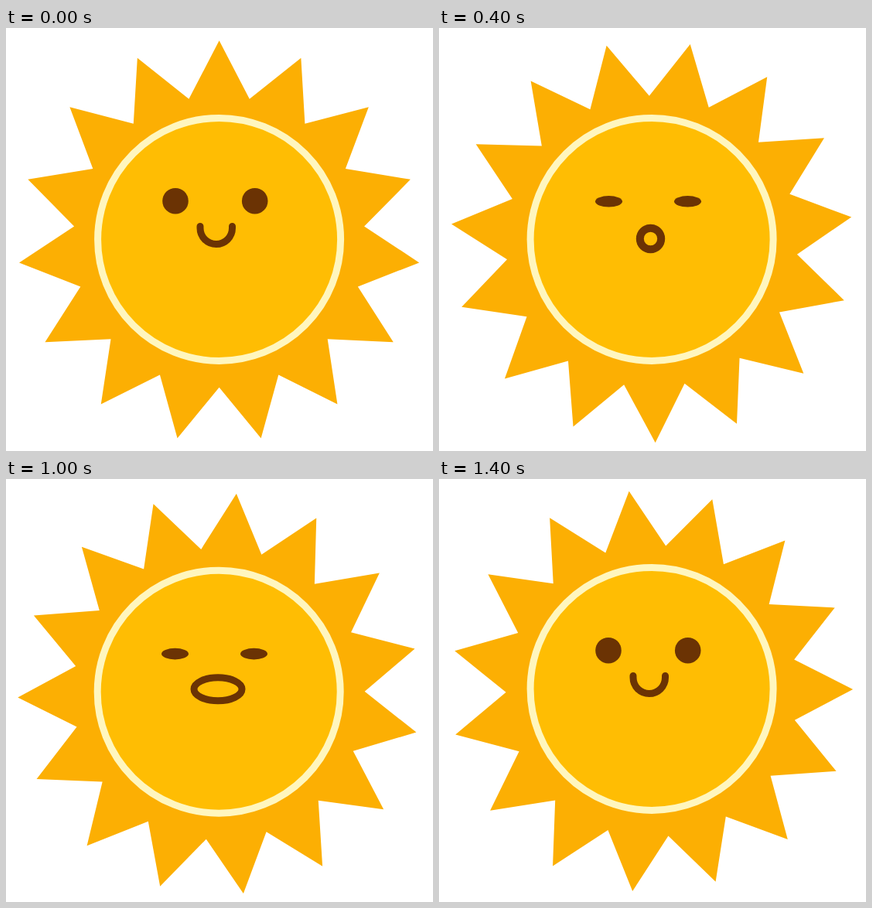
Recreate the animation shown at these times as an HTML page. Size 552x547 px, loop 1600 ms.

```html
<!DOCTYPE html>
<html lang="en">
<head>
<meta charset="utf-8">
<title>Sun</title>
<style>
  html, body { margin: 0; width: 100%; height: 100%; overflow: hidden; background: #fff; }
  svg { display: block; width: 100%; height: 100%; }
</style>
</head>
<body>
<svg viewBox="0 0 552 547">
  <g id="sun">
    <polygon id="rays" fill="#fcaf03"/>
    <circle id="disc" cy="273.4" r="157" fill="#ffbd03" stroke="#fff6be" stroke-width="9"/>
    <g fill="#6b3304">
      <ellipse id="left"/>
      <ellipse id="right"/>
    </g>
    <path id="mouth" fill="none" stroke="#6b3304" stroke-linecap="round"/>
  </g>
</svg>
<script>
const STEP = 200, RAYS = 15;
const $ = id => document.getElementById(id);
const set = (id, attrs) => {
  for (const k in attrs) $(id).setAttribute(k, attrs[k]);
};

const ring = (x, y, rx, ry = rx) =>
  `M${x - rx} ${y}a${rx} ${ry} 0 1 0 ${2 * rx} 0a${rx} ${ry} 0 1 0 ${-2 * rx} 0z`;
const cup = (x, y, r) =>
  `M${x - r} ${y}v2.3a${r} ${r} 0 0 0 ${2 * r} 0v-2.3`;

// Four poses of the body: turn in degrees, bob in pixels, centre x
const body = [
  { turn: 0, bob: 0, x: 275.6 },
  { turn: 5, bob: 1.8, x: 275.2 },
  { turn: 11, bob: 0, x: 275.1 },
  { turn: 17.5, bob: -2, x: 275.1 }
];

// Eight faces: left eye x, eye spacing, eye radii, mouth path and weight
const smile = { x: 219, gap: 102.7, rx: 16.8, ry: 16.8, y: 223.7, mouth: cup(271.75, 256.5, 20.75), w: 9 };
const shut = { x: 218.5, gap: 102, rx: 17.5, ry: 3.5, y: 224.3, w: 9 };
const faces = [
  smile,
  { ...shut, ry: 12, mouth: cup(272.5, 262, 14) },
  { ...shut, x: 219.5, ry: 7.3, mouth: ring(273.5, 272.5, 13.7), w: 10 },
  { ...shut, mouth: ring(275, 265.5, 27.5) },
  { ...shut, mouth: ring(275, 268.5, 27.5) },
  { ...shut, ry: 7.3, mouth: ring(274, 270, 31, 15) },
  { ...shut, ry: 12, mouth: "M239.7 269.7Q273 280.8 306.3 269.7" },
  smile
];

function star(cx, cy, turn) {
  const pts = [];
  for (let i = 0; i < RAYS * 2; i++) {
    const a = (turn + i * 180 / RAYS) * Math.PI / 180;
    const r = i % 2 ? 188.5 : 260;
    pts.push((cx + r * Math.sin(a)).toFixed(2) + "," + (cy - r * Math.cos(a)).toFixed(2));
  }
  return pts.join(" ");
}

function draw(n) {
  const b = body[n % body.length], f = faces[n];
  const eye = { cy: f.y, rx: f.rx, ry: f.ry };
  set("sun", { transform: `translate(0 ${b.bob})` });
  set("rays", { points: star(b.x, 276.2, b.turn) });
  set("disc", { cx: b.x });
  set("left", { ...eye, cx: f.x });
  set("right", { ...eye, cx: f.x + f.gap });
  set("mouth", { d: f.mouth, "stroke-width": f.w });
}

let start = null, last = 0;
function tick(now) {
  if (start === null) start = now;
  const n = Math.floor((now - start) / STEP) % faces.length;
  if (n !== last) draw(last = n);
  requestAnimationFrame(tick);
}
draw(0);
requestAnimationFrame(tick);
</script>
</body>
</html>
```
